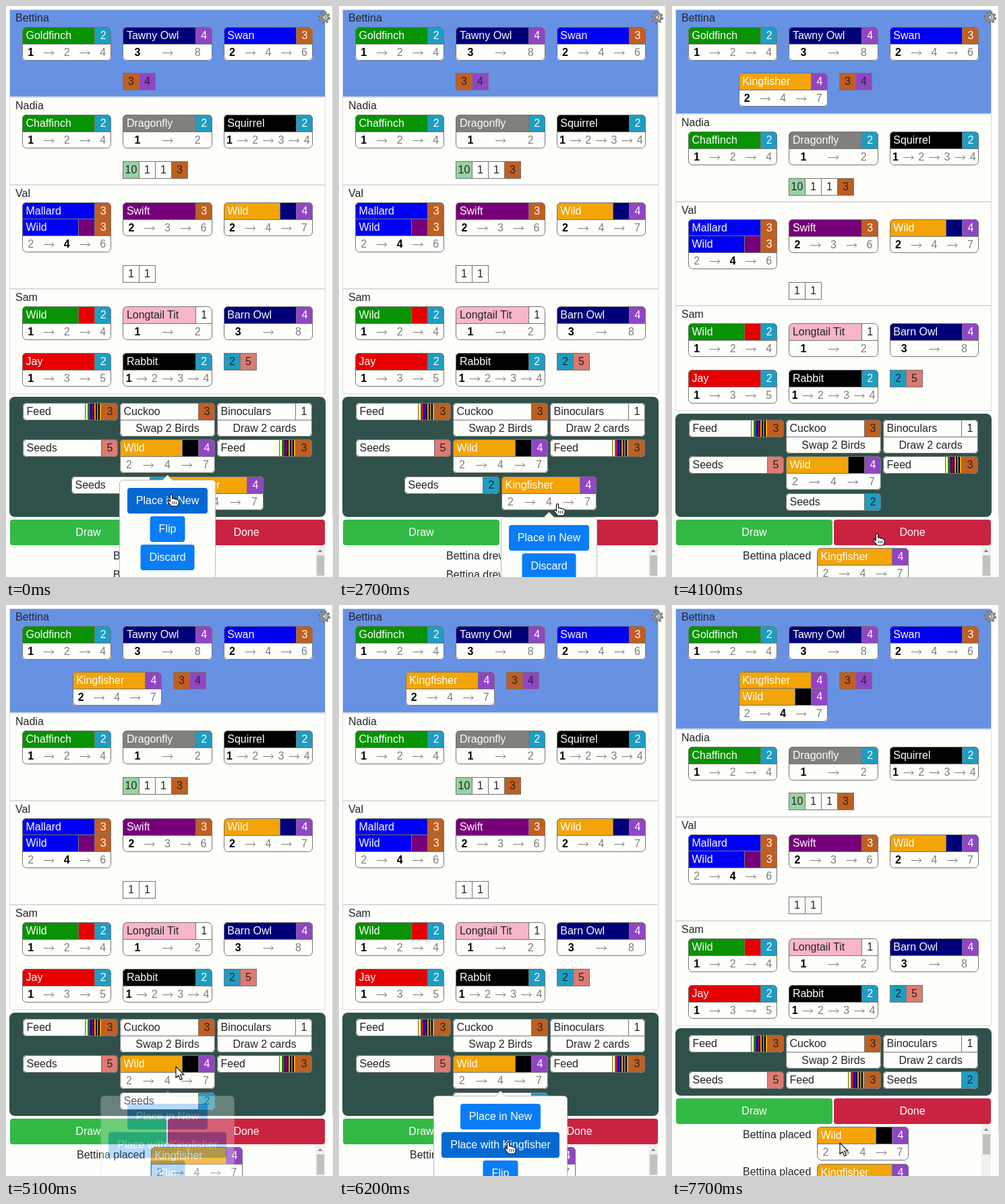
Recreate the animation shown at these times as an HTML page. Size 485 px wide and 846 px high, loop 8 s.

```html
<!DOCTYPE html>
<html lang="en">
<head>
<meta charset="utf-8">
<title>Bird card game</title>
<style>
  html, body { margin: 0; width: 100%; height: 100%; overflow: hidden; background: #fefefb; }
  svg { display: block; width: 100vw; height: 100vh; font: 16px "Liberation Sans", Arial, sans-serif; }
</style>
</head>
<body>
<svg id="stage" viewBox="0 0 485 846"></svg>
<script>
const stage = document.getElementById('stage');
const LOOP = 8000, STEP = 100;
const WHITE = '#fefefb', INK = '#212529', EDGE = '#747474', DIM = '#7d7d7d';
const GREEN = '#089204', NAVY = '#000078', BLUE = '#0000f4', GRAY = '#80807c', BLACK = '#000',
  PURPLE = '#760079', GOLD = '#f3a407', RED = '#e60000', PINK = '#f8b6c8';
const VALUE = { 1: WHITE, 2: '#1e9dc3', 3: '#c05f21', 4: '#9145c4', 5: '#de7a72', 10: '#98d2a2' };
const STRIPES = ['#ffd800', WHITE, GREEN, RED, BLUE, PURPLE, BLACK, GOLD, BLACK, GRAY, BLACK, GOLD];
const PLAYERS = ['Bettina', 'Nadia', 'Val', 'Sam'];
const CARD = 132.2, COLS = [24, 173.4, 322.8], HAND = [25, 169, 313];
const { round } = Math;
let clipId = 0;

const rect = (x, y, w, h, fill, extra = '') =>
  `<rect x="${x}" y="${y}" width="${w}" height="${h}" fill="${fill}" ${extra}/>`;
const box = (x, y, w, h, fill, stroke, r = 0) =>
  rect(x + .5, y + .5, w - 1, h - 1, fill, `stroke="${stroke}" rx="${r}"`);
const text = (s, x, y, fill = INK, anchor = 'start', weight = 400) =>
  `<text x="${x}" y="${y}" fill="${fill}" text-anchor="${anchor}" font-weight="${weight}">${s}</text>`;
const mid = (s, x, y, fill, weight) => text(s, x, y, fill, 'middle', weight);
const arrow = (x, y) =>
  `<path d="M${x - 7.5} ${round(y) + .5}h15m-3.6-3.2l3.6 3.2-3.6 3.2" fill="none" stroke="${DIM}"/>`;

function head(x, y, w, [name, color, value, patch]) {
  const ink = color === WHITE || color === PINK ? INK : WHITE;
  const left = round(x), edge = round(x + w) - 25;
  let out = rect(left, y, edge - left, 25, color);
  if (patch) {
    const fills = patch === 'all' ? STRIPES : [patch], sw = 24 / fills.length;
    fills.forEach((c, i) => out += rect(edge - 24 + i * sw, y, sw, 25, c));
    out += rect(edge - 24, y, 1, 25, EDGE);
  }
  return out + rect(edge, y, 25, 25, VALUE[value]) + rect(edge, y, 1, 25, EDGE) +
    text(name, x + 5.5, y + 18, ink) +
    mid(value, x + w - 12, y + 18, value === 1 ? INK : ink);
}

// Score track: numbers with arrows between them, one of them bold
function track(x, y, w, nums, bold) {
  const n = nums.length * 2 - 1, step = w / n * 1.012;
  let out = '';
  for (let i = 0; i < n; i++) {
    const cx = x + w / 2 + (i - (n - 1) / 2) * step, on = i / 2 === bold;
    out += i % 2 ? arrow(cx, y - 5) : mid(nums[i / 2], cx, y, on ? BLACK : DIM, on ? 700 : 400);
  }
  return out;
}

// Box edges snap to whole pixels, text keeps its fractional x
function card(x, top, w, heads, row, bold) {
  const y = round(top), left = round(x), width = round(x + w) - left;
  const body = heads.length * 24, h = body + (row ? 26 : 2);
  const id = 'c' + clipId++;
  let out = `<clipPath id="${id}">${rect(left, y, width, h, WHITE, 'rx="6"')}</clipPath><g clip-path="url(#${id})">` +
    rect(left, y, width, h, WHITE);
  heads.forEach((d, i) => {
    out += head(x, y + i * 24, w, d) + (i ? rect(left, y + i * 24, width, 1, EDGE) : '');
  });
  if (row) {
    const line = y + body + 1, base = line + 18;
    out += rect(left, line, width, 30, WHITE) + rect(left, line, width, 1, EDGE) +
      (typeof row === 'string' ? mid(row, x + w / 2, base) : track(x, base, w, row, bold));
  }
  return out + '</g>' + box(left, y, width, h, 'none', EDGE, 6);
}

function chips(x, top, list) {
  const y = round(top);
  return list.map((v, i) => {
    const left = round(x) + i * 24;
    return box(left, y, 25, 26, VALUE[v], EDGE) + mid(v, left + 12.5, y + 18);
  }).join('');
}

const FISHER = ['Kingfisher', GOLD, 4], WILD = ['Wild', GOLD, 4, BLACK];
const SEEDS = v => ['Seeds', WHITE, v], FEED = ['Feed', WHITE, 3, 'all'];
const RUN = [2, 4, 7];
const SHIFT = [0, 25, 48.8];

// phase: 0 nothing placed, 1 first card placed, 2 second card stacked on it
function panels(phase) {
  const tops = [5, ...[135.1, 265.1, 419.1, 575.1].map(y => y + SHIFT[phase])];
  const place = (p, col, heads, row, bold = 0, dy = 26.1) => card(COLS[col], tops[p] + dy, CARD, heads, row, bold);
  let out = '';
  PLAYERS.forEach((name, i) => {
    const y = round(tops[i]);
    out += box(5, y, 469, round(tops[i + 1]) - y, i ? WHITE : '#6792e4', '#d9dce0') +
      text(name, 14, y + 18);
  });
  out += place(0, 0, [['Goldfinch', GREEN, 2]], [1, 2, 4]) +
    place(0, 1, [['Tawny Owl', NAVY, 4]], [3, 8]) +
    place(0, 2, [['Swan', BLUE, 3]], [2, 4, 6]);
  if (phase) out += card(98.7, 99, CARD, phase > 1 ? [FISHER, WILD] : [FISHER], RUN, phase - 1);
  out += chips(phase ? 248 : 173, 99, [3, 4]);

  out += place(1, 0, [['Chaffinch', GREEN, 2]], [1, 2, 4]) +
    place(1, 1, [['Dragonfly', GRAY, 2]], [1, 2]) +
    place(1, 2, [['Squirrel', BLACK, 2]], [1, 2, 3, 4]) +
    chips(173, tops[1] + 94.5, [10, 1, 1, 3]);

  out += place(2, 0, [['Mallard', BLUE, 3], ['Wild', BLUE, 3, PURPLE]], [2, 4, 6], 1) +
    place(2, 1, [['Swift', PURPLE, 3]], [2, 3, 6]) +
    place(2, 2, [['Wild', GOLD, 4, NAVY]], RUN) +
    chips(173, tops[2] + 118.5, [1, 1]);

  out += place(3, 0, [['Wild', GREEN, 2, RED]], [1, 2, 4]) +
    place(3, 1, [['Longtail Tit', PINK, 1]], [1, 2]) +
    place(3, 2, [['Barn Owl', NAVY, 4]], [3, 8]) +
    place(3, 0, [['Jay', RED, 2]], [1, 3, 5], 0, 95) +
    place(3, 1, [['Rabbit', BLACK, 2]], [1, 2, 3, 4], 0, 95) +
    chips(323, tops[3] + 95, [2, 5]);
  return out;
}

function hand(phase) {
  const top = 578.6 + SHIFT[phase], y = round(top), bottom = phase > 1 ? 727 : 757;
  const put = (x, r, d, row) => card(x, top + [9.6, 63.6, 118.4][r], 141, [d], row);
  const [a, b, c] = HAND;
  let out = rect(5, y, 469, bottom - y, '#30514b', 'rx="8"') +
    put(a, 0, FEED) +
    put(b, 0, ['Cuckoo', WHITE, 3], 'Swap 2 Birds') +
    put(c, 0, ['Binoculars', WHITE, 1], 'Draw 2 cards') +
    put(a, 1, SEEDS(5));
  if (phase > 1) return out + put(b, 1, FEED) + put(c, 1, SEEDS(2));
  out += put(b, 1, WILD, RUN) + put(c, 1, FEED);
  return out + (phase ? put(b, 2, SEEDS(2)) : put(97, 2, SEEDS(2)) + put(241, 2, FISHER, RUN));
}

function footer(phase) {
  const y = phase > 1 ? 731 : 761;
  let out = rect(6, y, 232, 38, '#33b946', 'rx="4"') + rect(240, y, 233, 38, '#ca2341', 'rx="4"') +
    mid('Draw', 122, y + 24, WHITE) + mid('Done', 356.5, y + 24, WHITE);
  if (phase) {
    (phase > 1 ? [WILD, FISHER] : [FISHER]).forEach((d, i) => {
      const top = y + 42 + i * 55;
      out += text(PLAYERS[0] + ' placed', 105, top + 17) + card(215, top, 136, [d], RUN);
    });
  } else {
    for (const b of [820, 848]) out += mid(PLAYERS[0] + ' drew 2 cards', 232, b);
  }
  return out + rect(459, y + 38, 14, 90, '#f0f0ee') +
    `<path d="M462.5 ${y + 48}l3.5-4 3.5 4z" fill="#8a8a8a"/>` +
    rect(461, y + 53, 11, 30, '#c1c1bf');
}

const gear = '<g fill="none" stroke="#6e6e68"><circle cx="472" cy="17" r="8" stroke-width="2" stroke-dasharray="3.2 3.08"/>' +
  '<circle cx="472" cy="17" r="5.8" stroke-width="3" stroke="#8c8c85"/><circle cx="472" cy="17" r="2.8" fill="#cfcfc8"/></g>';

const PLACE = ['Place in New', 119], FLIP = ['Flip', 52], DISCARD = ['Discard', 80];
const POPS = [
  { cx: 239.5, y: 702, buttons: [PLACE, FLIP, DISCARD] },
  { cx: 311.5, y: 757, buttons: [PLACE, DISCARD] },
  { cx: 239.5, y: 727, buttons: [PLACE, ['Place with Kingfisher', 175], FLIP] }
];

function popover({ cx, y, buttons }, alpha, cur, pressed) {
  if (!alpha) return '';
  const w = Math.max(...buttons.map(b => b[1])) + 24, h = buttons.length * 42 + 21;
  let out = box(cx - w / 2, y, w, h, WHITE, '#bcbcb8', 5) +
    `<path d="M${cx - 8} ${y + 1}l8-8 8 8" fill="${WHITE}" stroke="#bcbcb8"/>` +
    rect(cx - 7.5, y + 1, 15, 1, WHITE);
  buttons.forEach(([label, bw], i) => {
    const x = cx - bw / 2, by = y + 12 + i * 42;
    const over = cur.x >= x && cur.x <= x + bw && cur.y >= by && cur.y <= by + 38;
    out += rect(x, by, bw, 38, over ? (pressed ? '#0462c8' : '#0369d2') : '#097df6', 'rx="4"') +
      mid(label, cx, by + 24, WHITE);
  });
  return `<g opacity="${alpha}">${out}</g>`;
}

// Pointer stops: time, x, y, hand shape
const PATH = [
  [0, 245, 724, 1], [500, 270, 723, 1], [600, 308, 722, 0], [700, 327, 720, 0],
  [2700, 324, 738, 1], [2800, 316, 759, 1], [2900, 309, 776, 1], [3100, 304, 782, 1],
  [4300, 302, 780, 1], [4400, 299, 777, 1], [4500, 295, 773, 1], [4700, 266, 716, 0], [4800, 252, 684, 0],
  [5600, 252, 697, 0], [5700, 251, 710, 0], [6000, 250, 733, 0], [6100, 250, 770, 1],
  [6200, 251, 796, 1], [7500, 249, 797, 0]
];
const ARROW = 'M0 0V16.5L3.8 13 6.6 19.4 9.4 18.2 6.6 12H12Z';
const FINGER = 'M-1.6 9.5V1.3a1.6 1.6 0 0 1 3.2 0V6q3-.9 3.8.7 3-.6 3.6 1 2.2 0 2.2 2.4V13l-1.8 4H.2L-4 11.6q-2-2.6-.4-3.2 1.2-.2 2.8 1.8z';

function pointer({ x, y, hand }) {
  return `<g transform="translate(${x} ${y})" stroke="#111"><path d="${hand ? FINGER : ARROW}" fill="#fff" stroke-width="1.2" stroke-linejoin="round"/>` +
    (hand ? '<path d="M2 10v4M4.7 10v4M7.4 10v4" stroke-width=".9"/>' : '') + '</g>';
}

function fades(t) {
  const swap = t < 1100 ? 0 : t < 1200 ? .05 : t < 1700 ? .65 : 1;
  return [1 - swap, t < 4100 ? swap : 0, t < 5100 || t >= 7700 ? 0 : t < 5200 ? .28 : 1];
}

function draw(t) {
  clipId = 0;
  const phase = t < 4100 ? 0 : t < 7700 ? 1 : 2;
  const [, x, y, shape] = PATH.filter(p => p[0] <= t).pop();
  const cur = { x, y, hand: shape };
  const pressed = t >= 3800 && t < 4100 || t >= 7000 && t < 7700;
  const alpha = fades(t);
  stage.innerHTML = rect(0, 0, 485, 846, WHITE) +
    rect(484, 0, 1, 846, '#f1f1ef') + rect(484, 0, 1, phase > 1 ? 780 : 755, '#cbcbc9') +
    panels(phase) + hand(phase) + footer(phase) + gear +
    POPS.map((p, i) => popover(p, alpha[i], cur, pressed)).join('') + pointer(cur);
}

const start = performance.now();
let last = -1;
function tick() {
  const t = Math.floor((performance.now() - start) % LOOP / STEP) * STEP;
  if (t !== last) draw(last = t);
  requestAnimationFrame(tick);
}
tick();
</script>
</body>
</html>
```
